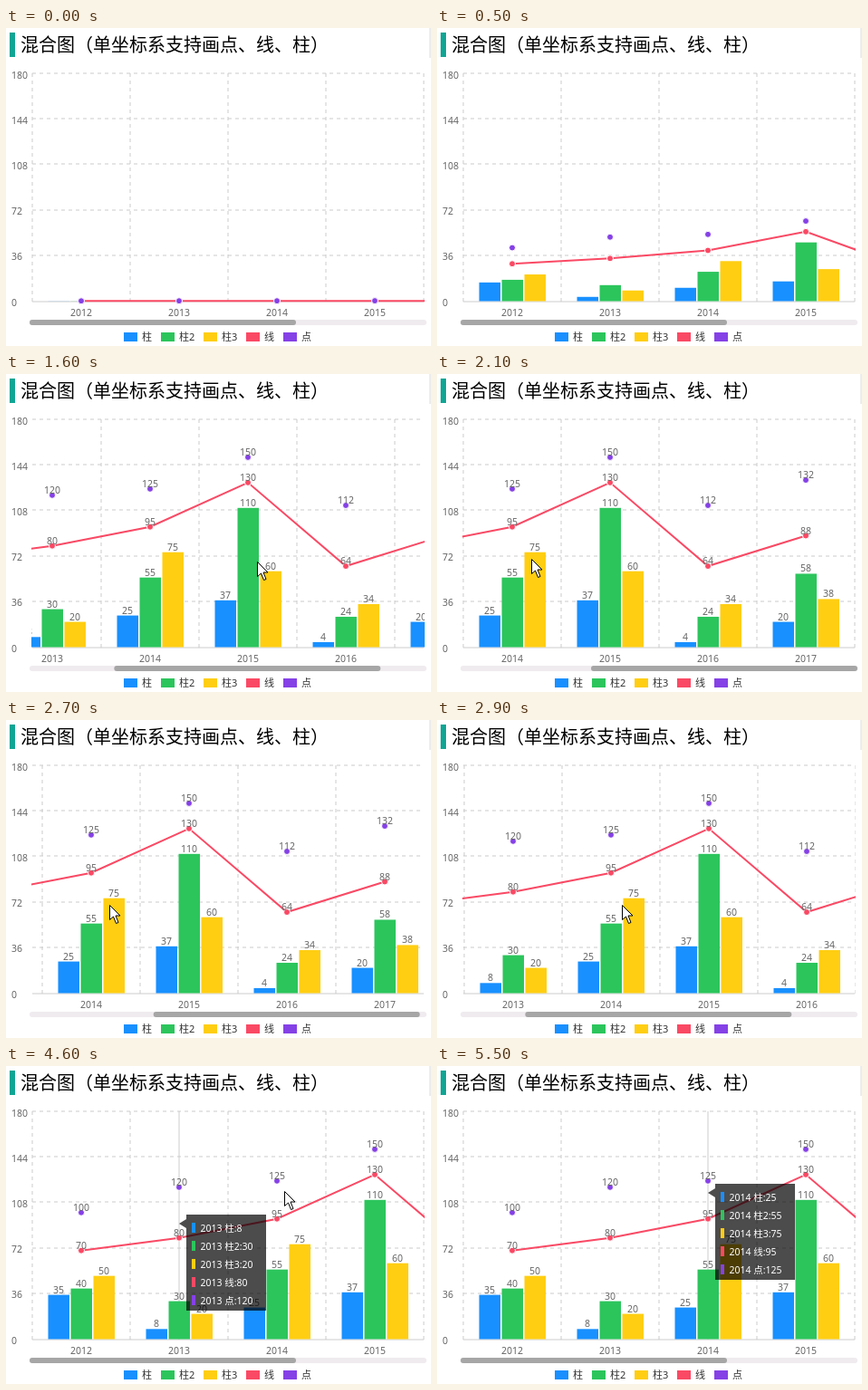
These frames come from a looping animation (469 by 351 pixels, 6300 ms). An HTML page with a canvas:

```html
<!DOCTYPE html>
<html lang="zh-CN">
<head>
<meta charset="utf-8">
<title>混合图</title>
<style>
html, body { margin: 0; width: 100%; height: 100%; overflow: hidden; background: #fff; }
canvas { display: block; }
</style>
</head>
<body>
<canvas id="stage" width="469" height="351"></canvas>
<script>
const ctx = document.getElementById('stage').getContext('2d');
const LOOP = 6300;
const LEFT = 29, RIGHT = 461, TOP = 50, BASE = 301.5, STEP = 108;
const SCALE = (BASE - TOP) / 180;
const FAMILY = '"Noto Sans", "Noto Sans CJK SC", sans-serif';
const SMALL = '10.5px ' + FAMILY;

const series = [
  { name: '柱', color: '#1890ff', data: [35, 8, 25, 37, 4, 20], legendX: 130 },
  { name: '柱2', color: '#2cc55c', data: [40, 30, 55, 110, 24, 58], legendX: 171 },
  { name: '柱3', color: '#ffce12', data: [50, 20, 75, 60, 34, 38], legendX: 218 },
  { name: '线', color: '#fa4964', data: [70, 80, 95, 130, 64, 88], legendX: 265 },
  { name: '点', color: '#8541e6', data: [100, 120, 125, 150, 112, 132], legendX: 306 }
];
const years = [2012, 2013, 2014, 2015, 2016, 2017];

// Pointer steps: time, x, y
const pointer = [
  [1100, 443, 246], [1200, 426, 224], [1300, 417, 215], [1400, 387, 211],
  [1600, 277, 207], [1700, 196, 204], [1900, 105, 204], [2100, 104, 204],
  [2700, 114, 204], [2800, 155, 204], [2900, 204, 204], [3000, 262, 204],
  [3100, 325, 204], [3300, 380, 204], [3400, 407, 204], [3500, 390, 201],
  [3700, 340, 193], [3800, 265, 182], [3900, 205, 174], [4000, 183, 172],
  [4100, 215, 170], [4200, 250, 165], [4300, 281, 161], [4600, 307, 138],
  [5300, 348, 140], [5400, 388, 141], [5500, -50, 0]
];
// Scroll steps: time, offset
const scrolls = [
  [0, 0], [1400, 30], [1600, 140], [1700, 216], [2700, 205],
  [2800, 160], [2900, 107], [3000, 50], [3100, 0]
];
// Tooltip steps: time, category index (-1 hides), top
const tips = [
  [0, -1, 0], [2200, 2, 196], [2700, -1, 0],
  [3400, 3, 196], [4000, 1, 164], [5000, 2, 130]
];

const at = (steps, t) => steps.filter(s => s[0] <= t).pop();
const yOf = v => BASE - v * SCALE;

function text(str, x, y, color, align = 'left', font = SMALL) {
  ctx.font = font;
  ctx.fillStyle = color;
  ctx.textAlign = align;
  ctx.fillText(str, x, y);
}

function rect(x, y, w, h, color) {
  ctx.fillStyle = color;
  ctx.fillRect(x, y, w, h);
}

function line(x1, y1, x2, y2, color, width = 1, dash = []) {
  ctx.setLineDash(dash);
  ctx.strokeStyle = color;
  ctx.lineWidth = width;
  ctx.beginPath();
  ctx.moveTo(x1, y1);
  ctx.lineTo(x2, y2);
  ctx.stroke();
  ctx.setLineDash([]);
}

function drawFrame() {
  rect(0, 0, 469, 351, '#fff');
  rect(4, 5, 6, 27, '#0fa594');
  rect(467, 0, 2, 33, '#ececec');
  text('混合图（单坐标系支持画点、线、柱）', 16, 26, '#000', 'left',
    '20px "Noto Sans CJK SC", sans-serif');
  for (let i = 0; i <= 5; i++) {
    const y = TOP + i * 50.2;
    text(180 - i * 36, 6, Math.round(y + 5.5), '#666');
    if (i < 5) line(LEFT, Math.round(y), RIGHT, Math.round(y), '#ccc', 1, [4, 4]);
  }
  for (const s of series) {
    rect(s.legendX, 336, 15, 10, s.color);
    text(s.name, s.legendX + 20, 345, '#333', 'left', '11px ' + FAMILY);
  }
}

function drawScrollbar(offset) {
  ctx.lineCap = 'round';
  line(LEFT, 325, RIGHT, 325, '#efebef', 6);
  const x = LEFT + offset * 2 / 3;
  line(x, 325, x + 288, 325, '#a6a6a6', 6);
  ctx.lineCap = 'butt';
}

function drawPoint(x, y, color) {
  ctx.beginPath();
  ctx.arc(x, y, 3.5, 0, Math.PI * 2);
  ctx.fillStyle = color;
  ctx.fill();
  ctx.strokeStyle = '#fff';
  ctx.lineWidth = 1;
  ctx.stroke();
}

function drawPlot(offset, grow, tipIndex) {
  const xOf = i => LEFT + STEP * (i + 0.5) - offset;
  const [, , , curve, dots] = series;
  ctx.save();
  ctx.beginPath();
  ctx.rect(LEFT - 1, 40, RIGHT - LEFT + 2, 282);
  ctx.clip();

  for (let i = 0; i <= 6; i++) {
    const x = LEFT + STEP * i - offset;
    line(x, TOP, x, 302, '#ccc', 1, [4, 4]);
  }
  line(LEFT, 302, RIGHT, 302, '#ccc');
  if (tipIndex >= 0) line(xOf(tipIndex), TOP, xOf(tipIndex), 302, '#ccc');

  series.slice(0, 3).forEach((s, k) => s.data.forEach((v, i) => {
    const h = v * SCALE * grow;
    rect(xOf(i) - 36.5 + k * 25, BASE - h, 23.5, h, s.color);
  }));

  ctx.beginPath();
  curve.data.forEach((v, i) => ctx.lineTo(xOf(i), yOf(v * grow)));
  ctx.strokeStyle = curve.color;
  ctx.lineWidth = 2;
  ctx.stroke();
  for (const s of [curve, dots])
    s.data.forEach((v, i) => drawPoint(xOf(i), yOf(v * grow), s.color));

  years.forEach((year, i) => text(year, xOf(i), 318, '#666', 'center'));
  if (grow === 1) {
    series.forEach((s, k) => s.data.forEach((v, i) => {
      const shift = k < 3 ? (k - 1) * 25 : 0;
      text(v, xOf(i) + shift, Math.round(yOf(v)) - 2, '#666', 'center');
    }));
  }
  ctx.restore();
  if (tipIndex >= 0) return xOf(tipIndex);
}

function drawTooltip(x, index, top) {
  const rows = series.map(s => `${years[index]} ${s.name}:${s.data[index]}`);
  const width = 28 + 6 * Math.max(...rows.map(r => r.length));
  const flip = x + 8 + width > RIGHT;
  const left = flip ? x - 8 - width : x + 8;
  const edge = flip ? x - 8 : x + 8;
  ctx.fillStyle = 'rgba(0,0,0,0.7)';
  ctx.beginPath();
  ctx.rect(left, top, width, 106);
  ctx.moveTo(x, top + 10);
  // Keep the winding equal to the box on either side
  ctx.lineTo(edge, top + 5);
  ctx.lineTo(edge, top + 15);
  ctx.fill();
  rows.forEach((row, i) => {
    rect(left + 6, top + 9 + i * 20, 4, 11, series[i].color);
    text(row, left + 15.5, top + 19 + i * 20, '#fff');
  });
}

function drawPointer(x, y) {
  ctx.save();
  ctx.translate(x + 0.5, y + 0.5);
  ctx.beginPath();
  for (const [px, py] of [[0, 0], [0, 16], [4, 12.5], [7, 20], [9.5, 19], [6.5, 11.5], [11.5, 11.5]])
    ctx.lineTo(px, py);
  ctx.closePath();
  ctx.fillStyle = '#fff';
  ctx.fill();
  ctx.strokeStyle = '#000';
  ctx.lineWidth = 1;
  ctx.stroke();
  ctx.restore();
}

function render(now) {
  const t = Math.floor((now % LOOP) / 100) * 100;
  const grow = Math.min(1, (t + 100) / 800) ** 3;
  const offset = at(scrolls, t)[1];
  const [, tipIndex, tipTop] = at(tips, t);
  const hand = at(pointer, t);

  drawFrame();
  const tipX = drawPlot(offset, grow, tipIndex);
  drawScrollbar(offset);
  if (tipIndex >= 0) drawTooltip(tipX, tipIndex, tipTop);
  if (hand) drawPointer(hand[1], hand[2]);
}

let start;
function tick(now) {
  start ??= now;
  render(now - start);
  requestAnimationFrame(tick);
}
render(0);
requestAnimationFrame(tick);
</script>
</body>
</html>
```
